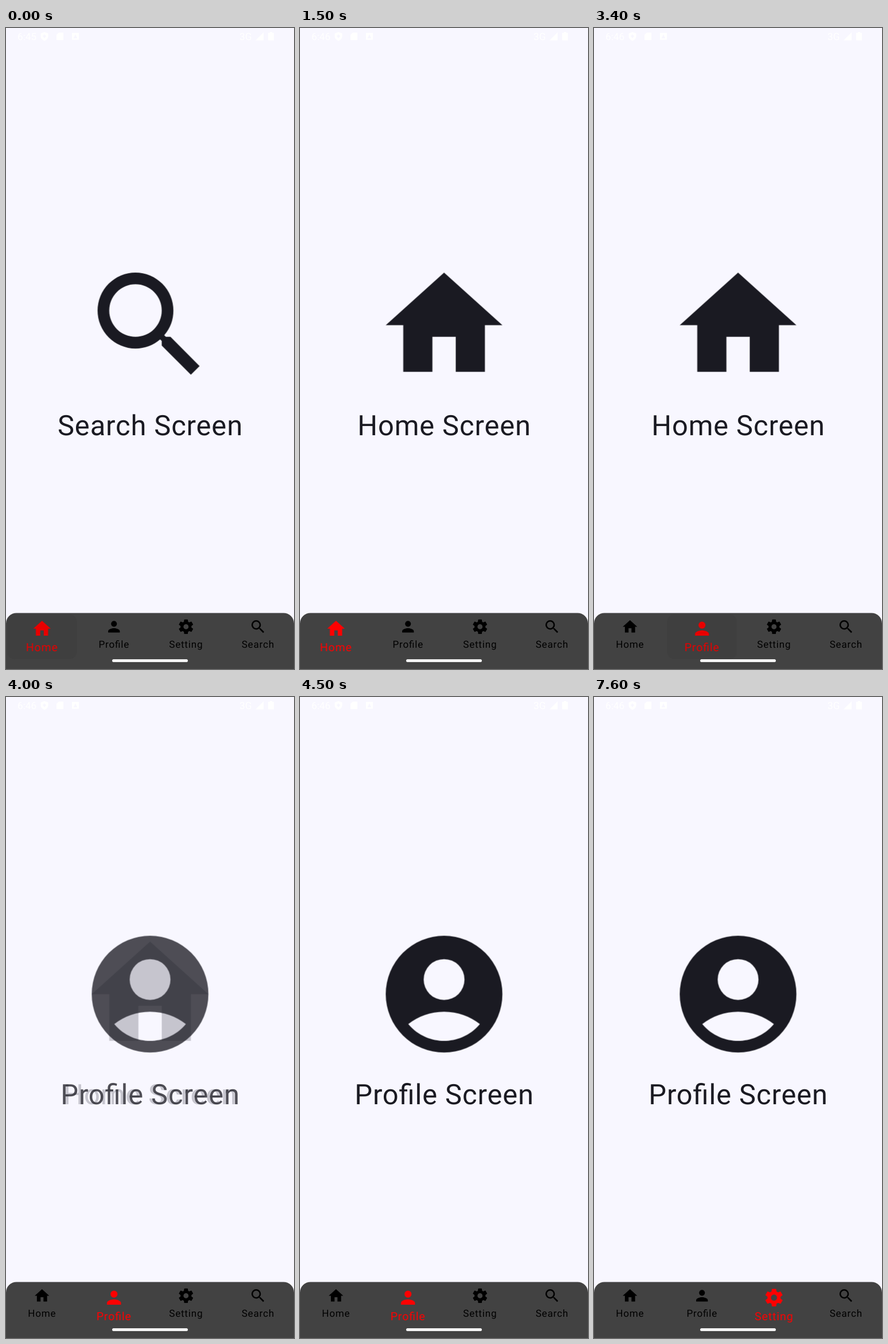
These frames come from a looping animation (502 px wide and 1116 px high, 8000 ms). An HTML page:

```html
<!DOCTYPE html>
<html lang="en">
<head>
<meta charset="utf-8">
<title>Bottom navigation</title>
<style>
  html, body { margin: 0; width: 100%; height: 100%; overflow: hidden; background: #f8f7ff; }
  svg { display: block; width: 100vw; height: 100vh; }
  text {
    font-family: Roboto, sans-serif;
    text-rendering: geometricPrecision;
    font-feature-settings: "liga" 1;
  }
  .screen { fill: #1a1a22; }
  .screen text { font-size: 48.8px; letter-spacing: .9px; text-anchor: middle; }
  .tab text { text-anchor: middle; }
  .off text { font-size: 17.08px; letter-spacing: .79px; }
  .on text { font-size: 19.52px; letter-spacing: .9px; }
  .status { fill: #fff; font-size: 17.2px; }
  .press { fill: #3f3f3f; }

  .anim, .on, .press { animation: 8s step-end infinite; }
  .on { animation-name: tint; }
  .press { animation-name: press; }
  .before { animation-name: before; }
  .after { animation-name: after; }
  .search-screen { animation-name: before; }
  .home-screen { animation-name: homeScreen; }
  .profile-screen { animation-name: profileScreen; }
  .home-on { animation-name: homeOn; }
  .home-off { animation-name: homeOff; }
  .profile-on { animation-name: profileOn; }
  .profile-off { animation-name: profileOff; }
  .setting-on { animation-name: settingOn; }
  .setting-off { animation-name: settingOff; }

  /* touch feedback: darker red and a faint tile until the finger lifts */
  @keyframes tint {
    0%, 38.75%, 91.25% { fill: #e90000; }
    18.75%, 50%, 95%, 100% { fill: #f00; }
  }
  @keyframes press {
    0%, 38.75%, 91.25% { opacity: 1; }
    18.75%, 50%, 95%, 100% { opacity: 0; }
  }

  @keyframes before { 0% { opacity: 1; } 8.75%, 100% { opacity: 0; } }
  @keyframes after { 0% { opacity: 0; } 8.75%, 100% { opacity: 1; } }
  @keyframes homeScreen {
    0% { opacity: 0; }
    8.75% { opacity: 1; }
    50% { opacity: .22; }
    52.5% { opacity: .05; }
    56.25%, 100% { opacity: 0; }
  }
  @keyframes profileScreen {
    0% { opacity: 0; }
    50% { opacity: .77; }
    52.5% { opacity: .94; }
    56.25%, 100% { opacity: 1; }
  }

  @keyframes homeOn { 0% { opacity: 1; } 38.75%, 100% { opacity: 0; } }
  @keyframes homeOff { 0% { opacity: 0; } 38.75%, 100% { opacity: 1; } }
  @keyframes profileOn { 0%, 91.25%, 100% { opacity: 0; } 38.75% { opacity: 1; } }
  @keyframes profileOff { 0%, 91.25%, 100% { opacity: 1; } 38.75% { opacity: 0; } }
  @keyframes settingOn { 0% { opacity: 0; } 91.25%, 100% { opacity: 1; } }
  @keyframes settingOff { 0% { opacity: 1; } 91.25%, 100% { opacity: 0; } }
</style>
</head>
<body>
<svg viewBox="0 0 502 1116" preserveAspectRatio="none">
  <defs>
    <!-- icons on a 24 unit grid, centred on the origin -->
    <g id="home"><path transform="translate(-12 -12)" d="M10 20v-6h4v6h5v-8h3L12 3 2 12h3v8z"/></g>
    <g id="profile"><path transform="translate(-12 -12)" d="M12 12a4 4 0 1 0 0-8 4 4 0 0 0 0 8zm0 2c-2.67 0-8 1.34-8 4v2h16v-2c0-2.66-5.33-4-8-4z"/></g>
    <g id="search"><path transform="translate(-12 -12)" d="M15.5 14h-.79l-.28-.27A6.47 6.47 0 0 0 16 9.5 6.5 6.5 0 1 0 9.5 16c1.61 0 3.09-.59 4.23-1.57l.27.28v.79l5 4.99L20.49 19l-4.99-5zm-6 0a4.5 4.5 0 1 1 0-9 4.5 4.5 0 0 1 0 9z"/></g>
    <g id="account"><path transform="translate(-12 -12)" fill-rule="evenodd" d="M12 2a10 10 0 1 0 0 20 10 10 0 0 0 0-20zm0 4a3.5 3.5 0 1 1 0 7 3.5 3.5 0 0 1 0-7zm0 14c-2.03 0-4.43-.82-6.14-2.88C7.55 15.8 9.68 15 12 15s4.45.8 6.14 2.12C16.43 19.18 14.03 20 12 20z"/></g>
    <path id="tooth" d="M-3.2-6.3-2.87-6.93-2.49-9.58Q-2.43-10-2-10H2Q2.43-10 2.49-9.58L2.87-6.93 3.2-6.3z"/>
    <g id="setting">
      <path fill-rule="evenodd" d="M-7.5 0a7.5 7.5 0 1 0 15 0 7.5 7.5 0 1 0-15 0zM-3.5 0a3.5 3.5 0 1 0 7 0 3.5 3.5 0 1 0-7 0z"/>
      <use href="#tooth"/>
      <use href="#tooth" transform="rotate(60)"/>
      <use href="#tooth" transform="rotate(120)"/>
      <use href="#tooth" transform="rotate(180)"/>
      <use href="#tooth" transform="rotate(240)"/>
      <use href="#tooth" transform="rotate(300)"/>
    </g>
  </defs>

  <rect width="502" height="1116" fill="#f8f7ff"/>

  <g class="status">
    <text class="anim before" x="20" y="20.5">6:45</text>
    <text class="anim after" x="20" y="20.5">6:46</text>
    <path fill-rule="evenodd" d="M67 7l6.5 2.5v5q0 5-6.5 8-6.500-3-6.500-8v-5zM67 11l-3 3 3 4 3-4z"/>
    <path d="M92 8h8v13H88V12z"/>
    <path fill-rule="evenodd" d="M115 8.500h12v12h-12zM121 11l-3.500 7h7z"/>
    <text x="407" y="20.500">3G</text>
    <path d="M449 7.500v14h-14z"/>
    <path d="M460 7h4v1.500h3v13h-10v-13h3z"/>
  </g>

  <g class="screen anim search-screen">
    <use href="#search" transform="translate(251.1 517.3) scale(10.165)"/>
    <text x="251.5" y="709">Search Screen</text>
  </g>
  <g class="screen anim home-screen">
    <use href="#home" transform="translate(251.1 517.3) scale(10.165)"/>
    <text x="251.5" y="709">Home Screen</text>
  </g>
  <g class="screen anim profile-screen">
    <use href="#account" transform="translate(251.1 517.3) scale(10.165)"/>
    <text x="251.5" y="709">Profile Screen</text>
  </g>

  <path fill="#424242" d="M0 1116V1036.700a18.300 18.300 0 0 1 18.300-18.300H483.700a18.300 18.300 0 0 1 18.300 18.300V1116z"/>
  <g id="tabs"></g>
  <rect x="185" y="1099" width="132" height="5" rx="2.5" fill="#f4f4f4"/>
</svg>
<script>
  const names = ["Home", "Profile", "Setting", "Search"];

  const face = (id, label, iconY, scale, textY) =>
    `<use href="#${id}" transform="translate(0 ${iconY}) scale(${scale})"/>
     <text y="${textY}">${label}</text>`;

  const tab = (label, i) => {
    const id = label.toLowerCase();
    const active = id === "search" ? "" :
      `<g class="anim ${id}-on">
         <rect class="press" x="-60.5" y="1021" width="121" height="77.500" rx="13"/>
         <g class="on">${face(id, label, 1045.7, 1.525, 1085.2)}</g>
       </g>`;
    return `<g class="tab" transform="translate(${62.75 + 125.5 * i} 0)">
      <g class="off anim ${id}-off">${face(id, label, 1042.4, 1.27, 1079.1)}</g>
      ${active}
    </g>`;
  };

  document.getElementById("tabs").innerHTML = names.map(tab).join("");
</script>
</body>
</html>
```
